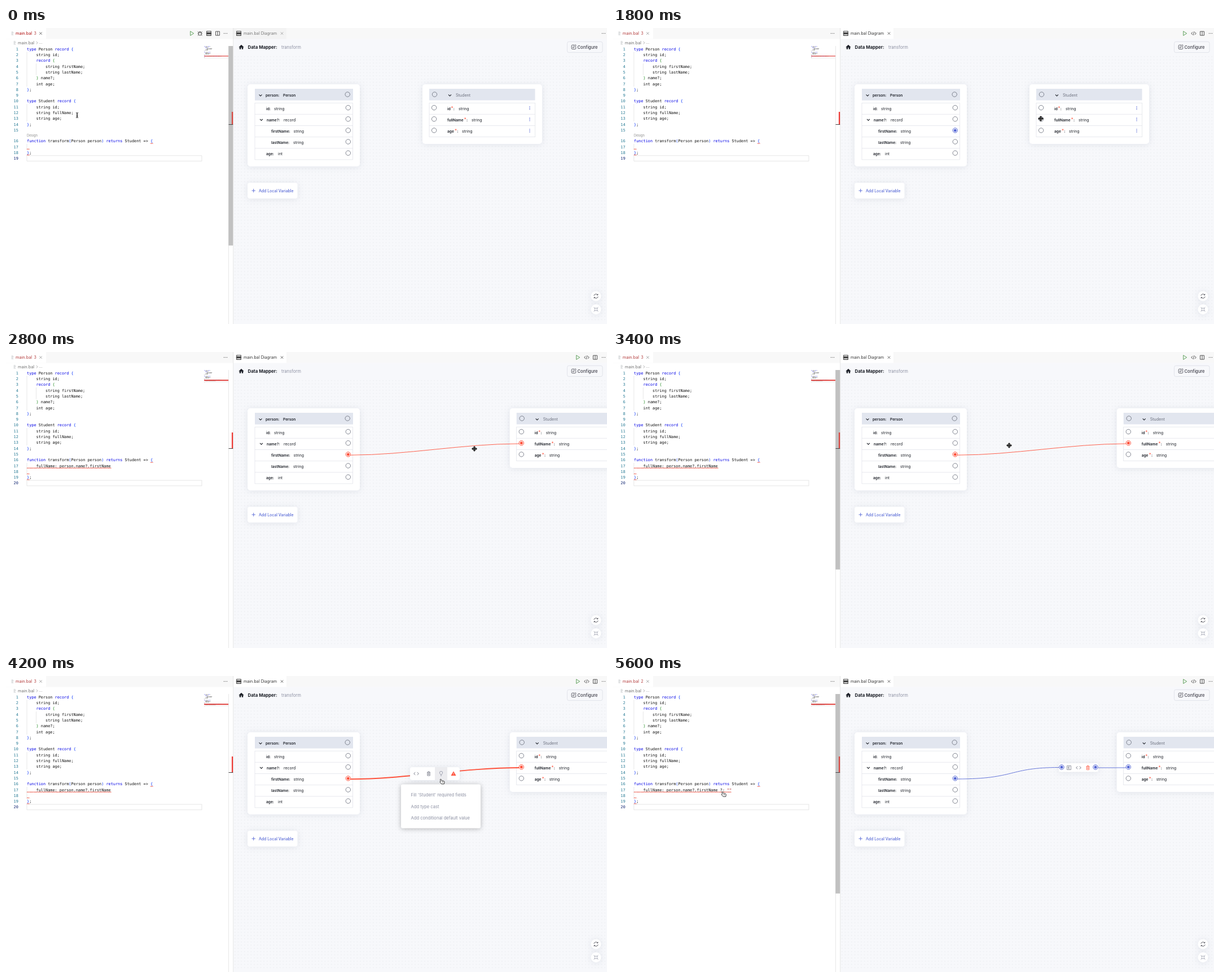
An HTML page for the animation above (5.7 s loop, 1065 px wide and 526 px high).

```html
<!DOCTYPE html>
<html lang="en">
<head>
<meta charset="utf-8">
<title>Data mapper</title>
<style>
  html, body { margin: 0; width: 100%; height: 100%; overflow: hidden; background: #fff; }
  svg { display: block; width: 100vw; height: 100vh; }
  text { white-space: pre; font-family: Inter, "Open Sans", sans-serif; }
  .code { font-family: "DejaVu Sans Mono", "Noto Sans Mono", monospace; }
  .soft { filter: drop-shadow(0 1px 6px rgba(80, 90, 120, .13)); }
</style>
</head>
<body>
<svg viewBox="0 0 1065 526" xmlns="http://www.w3.org/2000/svg">
  <defs>
    <pattern id="dots" x="403" y="48" width="5.7" height="5.7" patternUnits="userSpaceOnUse">
      <circle cx="2.8" cy="2.8" r=".55" fill="#dcdee3"/>
    </pattern>
  </defs>
  <g id="scene"></g>
  <g id="cursor"></g>
</svg>
<script>
const LOOP = 5700, STEP = 100;
const RED = '#fe523c', BLUE = '#5567d5', DARK = '#1d2028', GREY = '#8d91a3', ICON = '#424242';
const CODE_X = 37, CHAR = 4.13, LINE = 10.3;
const scene = document.getElementById('scene');
const cursor = document.getElementById('cursor');

const rect = (x, y, w, h, fill, extra = '') =>
  `<rect x="${x}" y="${y}" width="${w}" height="${h}" fill="${fill}" ${extra}/>`;
const path = (d, stroke, width = 1, fill = 'none') =>
  `<path d="${d}" stroke="${stroke}" stroke-width="${width}" fill="${fill}" stroke-linejoin="round"/>`;
const circle = (x, y, r, fill, stroke = 'none', width = 1) =>
  `<circle cx="${x}" cy="${y}" r="${r}" fill="${fill}" stroke="${stroke}" stroke-width="${width}"/>`;
const text = (x, midY, content, size, fill, extra = '') =>
  `<text x="${x}" y="${midY + size * .36}" font-size="${size}" fill="${fill}" ${extra}>${content}</text>`;
const at = (x, y, content) => `<g transform="translate(${x} ${y})">${content}</g>`;
const escape = s => s.replace(/&/g, '&amp;').replace(/</g, '&lt;').replace(/>/g, '&gt;');

// Small icons, each drawn around its own centre
const icons = {
  play: path('M-2.8 -3.8L3.2 0L-2.8 3.8Z', '#388a34', .8),
  bug: path('M-2.4 -1.5h4.8v2.5a2.4 2.6 0 0 1 -4.8 0zM-1.8 -1.5a1.8 1.8 0 0 1 3.6 0M-4 -3l1.6 1.5M4 -3l-1.6 1.5M-4.2 .5h1.8M4.2 .5h-1.8M-3.8 3.8l1.7 -1.4M3.8 3.8l-1.7 -1.4', ICON, .9),
  flow: path('M-3.8 -3.8h7.6v2.6h-7.6zM-3.8 1.2h7.6v2.6h-7.6zM0 -1.2v2.4M-4.8 0h9.6', ICON, 1.1),
  split: path('M-3.5 -3.5h7v7h-7zM0 -3.5v7', ICON, .9),
  more: [-2.6, 0, 2.6].map(x => circle(x, 0, .65, ICON)).join(''),
  angles: color => path('M-1.7 -2.4L-4.3 0L-1.7 2.4M1.7 -2.4L4.3 0L1.7 2.4', color, .9),
  slash: path('M.7 -3.3L-.7 3.3', ICON, .8),
  close: color => path('M-2.2 -2.2L2.2 2.2M2.2 -2.2L-2.2 2.2', color, .8),
  file: path('M-1.9 -2.5h3.2M-1.9 -.8h4M-1.9 .9h2.7M-1.9 2.6h3.6', '#a4a9ae', .6),
  home: path('M-4.2 .2L0 -3.8L4.2 .2H3V3.6H1V.8H-1V3.6H-3V.2Z', DARK, .5, DARK),
  edit: path('M1 -3.6h-3.2q-1.6 0 -1.6 1.6v4.2q0 1.6 1.6 1.6h4.4q1.6 0 1.6 -1.6v-2.8M-1.5 1.5l.4 -1.8l4 -4l1.4 1.4l-4 4z', '#40404b', .8),
  chevron: path('M-2.5 -1.2L0 1.3L2.5 -1.2', DARK, 1.1),
  trash: color => path('M-2.8 -2.4h5.6M-1.1 -2.4v-1h2.2v1M-2.2 -2.4v6h4.4v-6M-.7 -.8v2.8M.7 -.8v2.8', color, .8),
  bulb: path('M-1 2v-1q-1.7 -1 -1.7 -2.5a2.7 2.7 0 0 1 5.4 0q0 1.5 -1.7 2.5v1zM-1 3.7h2', '#8d91a3', .8),
  warn: path('M0 -3.6L4 3.3H-4Z', RED, .8, RED) + path('M0 -1.5v2.3M0 1.6v.8', '#fff', .8),
  refresh: path('M-3.7 -.7a3.8 3.8 0 0 1 6.8 -1.5M3.7 .7a3.8 3.8 0 0 1 -6.8 1.5M3.4 -4v2h-2M-3.4 4v-2h2', '#40404b', .8),
  shrink: path('M-4 -4l2.8 2.8v-2M-1.2 -1.2h-2M4 -4l-2.8 2.8v-2M1.2 -1.2h2M-4 4l2.8 -2.8v2M-1.2 1.2h-2M4 4l-2.8 -2.8v2M1.2 1.2h2', GREY, .7),
  expr: path('M-3.5 -3.5h7v7h-7zM1.4 -1.8h-2.6v3.6h2.6M-1.2 0h2.2', '#6b6f7d', .7)
};

const pointers = {
  beam: path('M-2 -4.5q2 0 2 1.2v6.6q0 1.2 -2 1.2M2 -4.5q-2 0 -2 1.2v6.6q0 1.2 2 1.2M-1 1.5h2', '#111', .9),
  cross: path('M0 -4.6l1.9 2.1h-1.2v1.8h1.8v-1.2l2.1 1.9l-2.1 1.9v-1.2h-1.8v1.8h1.2l-1.9 2.1l-1.9 -2.1h1.2v-1.8h-1.8v1.2l-2.1 -1.9l2.1 -1.9v1.2h1.8v-1.8h-1.2z', '#111', .6, '#111'),
  hand: path('M-3.6 -3.7q.9 -1.1 1.8 0l1 2.3q2.2 -.4 4.2 .9q1 .8 .5 2.2l-.6 2.6h-4.5l-2.8 -3.2q-.3 -1.5 1.2 -1zM0 .1v1.4M1.6 .3v1.3', '#222', .9, '#fff')
};

const HEAD = `type Person record {
    string id;
    record {
        string firstName;
        string lastName;
    } name?;
    int age;
};

type Student record {
    string id;
    string fullName;
    string age;
};

function transform(Person person) returns Student => {
`.split('\n').slice(0, -1);
const MAPPING = '    fullName: person.name?.firstName';
const programs = {
  empty: [...HEAD, '', '};', ''],
  mapped: [...HEAD, MAPPING, '', '};', ''],
  defaulted: [...HEAD, MAPPING + ' ?: ""', '', '};', '']
};

function stateAt(t) {
  return {
    program: t < 2000 ? 'empty' : t < 4700 ? 'mapped' : 'defaulted',
    errors: t < 2000 || (t >= 2700 && t < 4700) || t >= 5300,
    count: t < 5100 ? 3 : 2,
    diagramFocus: t >= 1600,
    picked: t >= 1600,
    scrollbar: t < 1500 || (t >= 2000 && t < 2600) || (t >= 3000 && t < 3500) || t >= 5400,
    toolbar: t >= 3500 && t < 4700,
    menu: t >= 3900 && t < 4600
  };
}

function highlight(lines) {
  const bracketColors = ['#0431fa', '#319331', '#7b3814'];
  let depth = 0;
  return lines.map(line => line.replace(/""|\b(?:type|record|returns|function)\b|[{}()]|[^\w]|\w+/g, token => {
    let color = '';
    if (token === '""') color = '#a31515';
    else if (/^(type|record|returns|function)$/.test(token)) color = '#0000e6';
    else if (/[{(]/.test(token)) color = bracketColors[depth++];
    else if (/[})]/.test(token)) color = bracketColors[--depth];
    return color ? `<tspan fill="${color}">${token}</tspan>` : escape(token);
  }));
}

function squiggle(x, y, width) {
  const teeth = Math.max(1, Math.round(width / 2.3));
  return path(`M${x} ${y}` + 'l1.15 -1.2l1.15 1.2'.repeat(teeth), '#e51400', .75);
}

function minimap(lines, s) {
  let out = '';
  lines.forEach((line, i) => {
    for (const word of line.matchAll(/\S+/g)) {
      const color = /^(type|record|returns|function)$/.test(word[0]) ? '#6666ff' : '#777';
      out += rect(351 + word.index * .57, 32.5 + i * 1.14, word[0].length * .57, .8, color, 'opacity=".75"');
    }
  });
  const thick = s.program !== 'empty';
  if (s.errors) out += rect(351, 49.3, 43.5, thick ? 2 : 1.2, '#e0403c');
  out += rect(351, 53.3, 43.5, .8, s.errors ? '#ececec' : '#cfe0f2');
  return out;
}

function editor(s) {
  const lines = programs[s.program];
  const lens = s.program === 'empty';
  const lineY = i => 37.3 + i * LINE + (lens && i > 14 ? 9 : 0);
  const last = lines.length - 1;
  const guide = (x, from, to) =>
    path(`M${x} ${lineY(from) - 5.1}V${lineY(to) + 5.1}`, '#d9d9d9', .6);
  let out = guide(37, 1, 6) + guide(53.5, 3, 4) + guide(37, 10, 12) + guide(37, 16, last - 2);
  out += path(`M${CODE_X} ${lineY(last) - 4.9}H347V${lineY(last) + 4.8}H${CODE_X}Z`, '#dcdcdc', .7);
  if (lens) out += text(CODE_X, 191, 'Design', 5.8, '#8f8f8f');
  highlight(lines).forEach((line, i) => {
    out += text(21.8, lineY(i), i + 1, 6.86, i === last ? '#0b216f' : '#237893', 'class="code" text-anchor="end"');
    out += text(CODE_X, lineY(i), line, 6.86, '#111', 'class="code"');
  });
  if (s.errors) {
    out += squiggle(CODE_X + 53 * CHAR, lineY(15) + 5, 3.5);
    if (!lens) out += squiggle(CODE_X, lineY(16) + 4.8, lines[16].length * CHAR);
    out += squiggle(CODE_X, lineY(last - 2) + 4.8, 3.5) + squiggle(CODE_X, lineY(last - 1) + 4.8, 3.5);
  } else {
    out += squiggle(CODE_X, lineY(last) + 5, 3.5);
  }
  out += minimap(lines, s) + path('M394.5 32V526', '#e2e2e2', .8);
  if (s.scrollbar) out += rect(394.3, 32, 8.2, 354.5, '#c1c1c1');
  const markTop = !s.errors ? 172 : lens ? 149 : 143;
  out += rect(400, markTop, 2.6, s.errors ? 171.5 - markTop : 7.5, s.scrollbar ? '#d8453f' : '#ee3a35');
  out += rect(394.5, 171, 8.2, 1, s.errors ? '#444' : '#8c2f2f');
  return out;
}

function tabs(s) {
  const right = s.diagramFocus;
  let out = rect(0, 0, 1065, 19.5, '#f8f8f8') + rect(0, 0, 71, 19.6, '#fff') +
    rect(403, 0, 94, 19.6, right ? '#fff' : '#f3f3f3');
  out += at(11.5, 9.5, icons.file) + text(17, 9.6, 'main.bal', 7.3, right ? '#b23a3a' : '#ad0707') +
    text(49.5, 9.6, s.count, 7, '#b23a3a') + at(61.5, 9.6, icons.close(right ? '#888' : ICON));
  out += at(15.5, 26.3, icons.file) + text(21, 26.3, 'main.bal', 7.3, '#707070') +
    path('M53.8 24l2.2 2.3l-2.2 2.3', '#888', .7) + text(58.5, 25.8, '...', 7.2, '#707070');
  out += at(412.5, 9.6, icons.flow) + text(421, 9.6, 'main.bal Diagram', 7.2, right ? '#333' : '#777') +
    at(489, 9.6, icons.close(right ? ICON : '#999'));
  out += at(389, 9.6, icons.more) + at(1059, 9.6, icons.more);
  if (right) {
    out += at(1013.5, 9.6, icons.play) + at(1029, 9.6, icons.angles(ICON) + icons.slash) + at(1044, 9.6, icons.split);
  } else {
    out += at(329.5, 9.6, icons.play) + at(343.7, 9.6, icons.bug) + at(359.5, 9.6, icons.flow) + at(375, 9.6, icons.split);
  }
  return out + path('M402.7 0V526', '#e0e0e0', .8);
}

function port(x, y, color) {
  return circle(x, y, 4.2, color ? '#fff' : 'none', color || '#6b6f7d', color ? 1 : .85) +
    (color ? circle(x, y, 2.5, color) : '');
}

function card(x, y, w, h, radius = 5) {
  return rect(x, y, w, h, '#fff', `rx="${radius}" class="soft"`);
}

function table(x, y, w, rows) {
  let out = rect(x, y, w, rows * 20.15, '#fff', 'stroke="#dee0e7" stroke-width=".7"');
  for (let i = 1; i < rows; i++) out += path(`M${x} ${y + i * 20.15}h${w}`, '#dee0e7', .7);
  return out;
}

const label = (x, y, content, size = 6.6) => text(x, y, content, size, DARK, 'font-weight="600"');
const typeName = (x, y, content) => text(x, y, content, 6.9, DARK);

function personCard(color) {
  const rows = [
    [461, 'id:', 475, 'string'], [462, 'name?:', 492, 'record'],
    [470, 'firstName:', 509.5, 'string'], [470, 'lastName:', 509, 'string'], [461, 'age:', 482, 'int']
  ];
  let out = card(428, 100, 199, 146) + rect(441, 108, 174, 20.7, '#e2e6ef') + table(441, 133.2, 173.5, 5);
  out += at(451, 119.5, icons.chevron) + label(460, 119.8, 'person:') + label(491, 119.8, 'Person') + port(605.2, 118);
  out += at(452.5, 163, icons.chevron);
  rows.forEach(([x, name, typeX, type], i) => {
    const y = 143.2 + i * 20.15;
    out += label(x, y, name) + typeName(typeX, y, type) + port(606.3, y - 1.6, i === 2 ? color : '');
  });
  return out;
}

function studentCard(color) {
  const rows = [['id', 788.5, 802], ['fullName', 811.7, 825], ['age', 795, 808]];
  let out = card(738, 100, 212, 106) + rect(750, 108, 187.5, 20.5, '#e2e6ef') + table(750, 133.2, 187.7, 3);
  out += port(759.5, 118) + at(786.5, 119.5, icons.chevron) + text(797, 119.8, 'Student', 7.1, '#6b6f7d');
  rows.forEach(([name, starX, typeX], i) => {
    const y = 143.2 + i * 20.15;
    out += label(782, y, name) + text(starX, y - 1, '*', 8, RED) + label(starX + 4.3, y, ':') + typeName(typeX, y, 'string');
    out += port(758.6, y - 1.6, i === 1 ? color : '');
    for (const dy of [-2.4, 0, 2.4]) out += circle(928, y - 1 + dy, .75, BLUE);
  });
  return out;
}

function toolbar() {
  return card(716, 162, 88, 23, 4) + rect(760, 162, 22, 23, '#ececef') +
    at(727, 173.5, icons.angles('#6b6f7d')) + at(749, 173.5, icons.trash('#6b6f7d')) +
    at(771, 173.5, icons.bulb) + at(793, 173.5, icons.warn);
}

function menu() {
  const items = ["Fill 'Student' required fields", 'Add type cast', 'Add conditional default value'];
  return rect(700, 192.5, 141, 78, '#fff', 'rx="3" style="filter:drop-shadow(0 1px 4px rgba(0,0,0,.28))"') +
    items.map((item, i) => text(717.5, 211.3 + i * 20.6, item, 7.6, GREY)).join('');
}

function expressionNode() {
  return card(790, 155, 70, 15.5, 3) + port(795, 162, BLUE) + port(855, 162, BLUE) +
    at(808, 163, icons.expr) + at(825, 163, icons.angles('#6b6f7d')) + at(841.5, 163, icons.trash(RED));
}

function diagram(s) {
  const linked = s.program !== 'empty', defaulted = s.program === 'defaulted';
  const color = defaulted ? BLUE : RED;
  let out = rect(403, 19.5, 662, 506.5, '#f7f8fb') + rect(403, 48, 662, 474, 'url(#dots)');
  out += at(417, 33.8, icons.home) + text(428.5, 33.8, 'Data Mapper:', 7.9, DARK, 'font-weight="700"') +
    text(488, 33.8, 'transform', 7.6, GREY);
  out += rect(994.5, 24.3, 62.5, 19.3, '#f7f8fb', 'rx="3" stroke="#dcdfe6" stroke-width=".8"') +
    at(1006, 33.8, icons.edit) + text(1012.5, 34, 'Configure', 7.6, '#40404b', 'font-weight="500"');
  out += personCard(linked ? color : s.picked ? BLUE : '');
  out += at(linked ? 154.7 : 0, 0, studentCard(linked ? color : ''));
  out += card(428, 275, 88.5, 28, 4) + path('M435.5 289h6.4M438.7 285.8v6.4', BLUE, .9) +
    text(448, 289.3, 'Add Local Variable', 6.9, BLUE, 'font-weight="500"');
  if (defaulted) {
    out += path('M610 183C715 183 700 162.5 791 162.5M859 163H909', BLUE, .9) + expressionNode();
  } else if (linked) {
    out += path('M610 183.2C710 183.2 810 163 909 163', RED, s.toolbar ? 1.9 : .9);
  }
  if (s.toolbar) out += toolbar();
  if (s.menu) out += menu();
  for (const [y, icon] of [[476.5, icons.refresh], [500, icons.shrink]]) {
    out += `<g class="soft">${circle(1045.5, y, 9, '#fff')}</g>` + at(1045.5, y, icon);
  }
  return out;
}

const route = [
  [0, 126, 155], [200, 126, 155], [900, 47, 210], [1200, 47, 210], [1500, 606, 182], [1600, 606, 182],
  [1800, 758, 161], [2000, 760, 161.5], [2400, 760, 161.5], [2800, 830, 172], [3400, 702, 166],
  [3700, 771, 175], [4100, 773, 187.5], [4200, 773, 187.5], [4400, 816, 250], [4600, 816, 250],
  [5000, 824, 186.5], [5100, 824, 186.5], [5500, 196.5, 210], [LOOP, 196.5, 210]
];

function cursorAt(t) {
  const i = route.findIndex(key => key[0] > t);
  const [t0, x0, y0] = route[i - 1], [t1, x1, y1] = route[i];
  const p = (t - t0) / (t1 - t0), ease = p * p * (3 - 2 * p);
  return [x0 + (x1 - x0) * ease, y0 + (y1 - y0) * ease];
}

function pointerKind(t, x) {
  if (x < 394) return t < 3000 ? 'beam' : 'hand';
  return t >= 3600 && t < 4700 ? 'hand' : 'cross';
}

let lastKey = '';
function render(t) {
  const s = stateAt(t), key = JSON.stringify(s);
  if (key !== lastKey) {
    scene.innerHTML = rect(0, 0, 1065, 526, '#fff') + editor(s) + diagram(s) + tabs(s);
    lastKey = key;
  }
  const [x, y] = cursorAt(t);
  cursor.innerHTML = at(x, y, pointers[pointerKind(t, x)]);
}

const start = performance.now();
function frame() {
  const elapsed = (performance.now() - start) % LOOP;
  render(Math.floor(elapsed / STEP) * STEP);
  requestAnimationFrame(frame);
}
frame();
</script>
</body>
</html>
```
